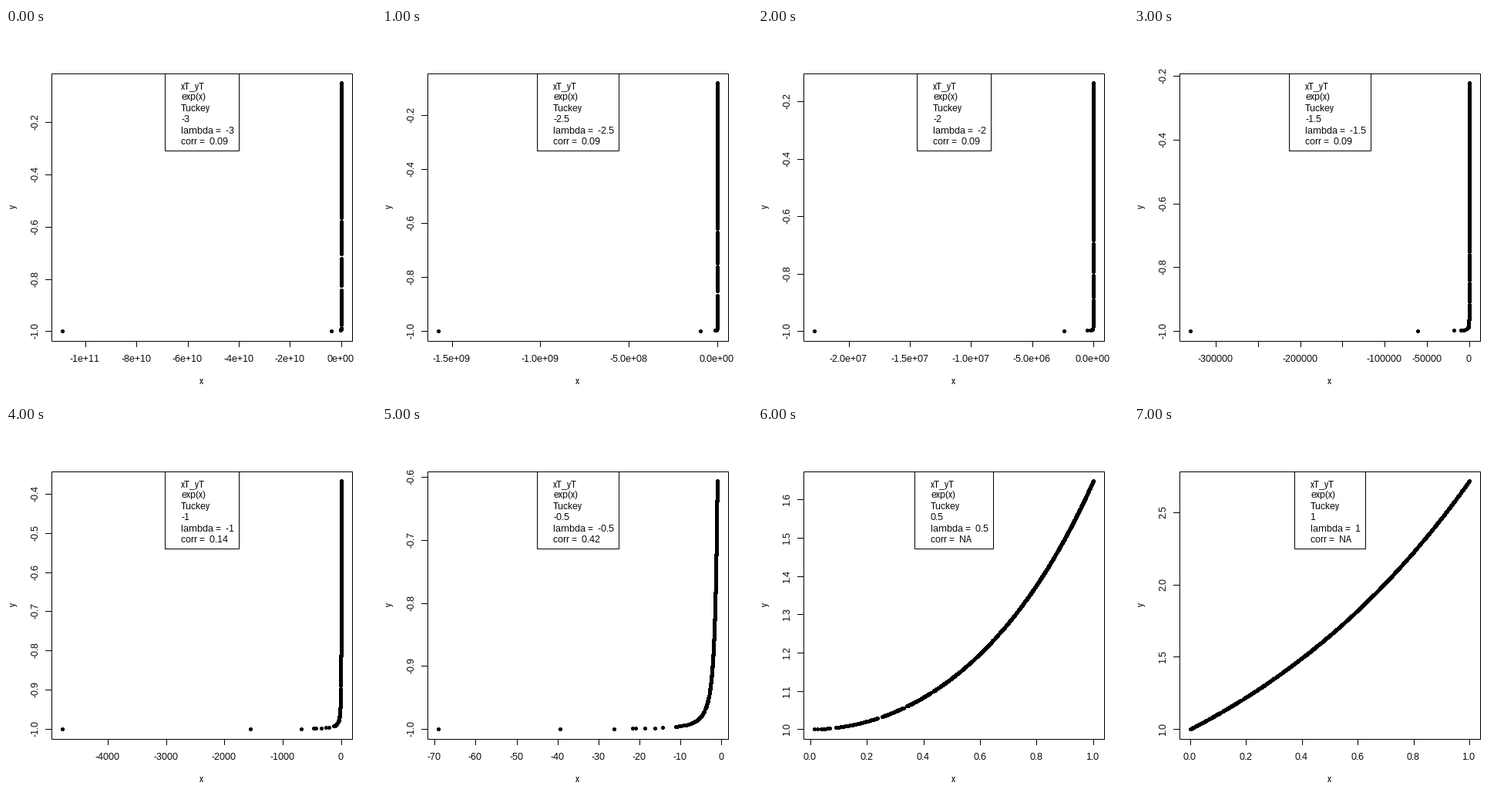
Write a matplotlib script that moves like this. It is 480 by 480 pixels and loops after 8 s.

```python
import math

import matplotlib.pyplot as plt
import numpy as np
from matplotlib.animation import FuncAnimation
from matplotlib.collections import PolyCollection
from matplotlib.patches import Rectangle

plt.rcParams["font.family"] = "Liberation Sans"
plt.rcParams["font.size"] = 9
plt.rcParams["text.hinting"] = "native"
plt.rcParams["text.hinting_factor"] = 1

SIZE = 480
PX = 0.75  # points per pixel at 96 dpi
LEFT, RIGHT, TOP, BOTTOM = 59.04, 449.76, 59.04, 406.56
MID_X, MID_Y = (LEFT + RIGHT) / 2, (TOP + BOTTOM) / 2
LINE = 14.4

# lambda, correlation, x tick step, x label format, y tick step
STEPS = [
    (-3, "0.09", 2e10, "%.0e", 0.2),
    (-2.5, "0.09", 5e8, "%.1e", 0.2),
    (-2, "0.09", 5e6, "%.1e", 0.2),
    (-1.5, "0.09", 5e4, "%.0f", 0.2),
    (-1, "0.14", 1000, "%.0f", 0.1),
    (-0.5, "0.42", 10, "%.0f", 0.1),
    (0.5, "NA", 0.2, "%.1f", 0.1),
    (1, "NA", 0.2, "%.1f", 0.5),
]

# Five pixel wide dot without its corner pixels
DOT = np.array([(-1, -2), (2, -2), (2, -1), (3, -1), (3, 2), (2, 2),
                (2, 3), (-1, 3), (-1, 2), (-2, 2), (-2, -1), (-1, -1)])


def make_sample():
    """Roughly uniform values on (0, 1), sparse near zero, with a few holes."""
    rng = np.random.default_rng(4)
    low = 1 / np.array([4777, 1550, 686, 471, 437, 345, 264, 206, 124, 117, 108, 96])
    n = 985
    rest = 0.0108 + 0.9887 * (np.arange(n) + rng.random(n)) / n
    edges = []
    for center, width in [(0.0605, 0.0071), (0.1125, 0.0085), (0.1866, 0.0086)]:
        rest = rest[abs(rest - center) > width / 2]
        edges += [center - width / 2, center + width / 2]
    return np.concatenate([low, rest, edges])


SAMPLE = make_sample()

fig = plt.figure(figsize=(5, 5), dpi=96, facecolor="white")
ax = fig.add_axes([0, 0, 1, 1])


def tukey(v, lam):
    return v**lam if lam > 0 else -(v**lam)


def line(x0, y0, x1, y1):
    # whole coordinates snap to the centre of their pixel
    ax.plot(np.floor([x0, x1]), np.floor([y0, y1]), color="black", lw=PX)


def frame_box(x0, y0, x1, y1):
    x0, y0, x1, y1 = np.floor([x0, y0, x1, y1])
    ax.add_patch(Rectangle((x0, y0), x1 - x0, y1 - y0, fc="white", ec="black",
                           lw=PX, joinstyle="miter"))


def dots(x, y):
    centers = np.floor(np.column_stack([x, y]))
    ax.add_collection(PolyCollection(centers[:, None] + DOT, facecolors="black",
                                     linewidths=0, zorder=3), autolim=False)


def label(x, y, text, ha="center", rotation=0):
    ax.text(x, y, text, ha=ha, va="baseline", rotation=rotation,
            rotation_mode="anchor")


def label_x(x, y, text):
    label(x - 1, y, text)


def label_y(x, y, text):
    label(x, y - 1, text, rotation=90)


def text_width(text):
    return sum({"-": 4, ".": 3}.get(c, 7) for c in text)


def scale(values, start, end):
    """Linear map with 4 % padding, and the padded data limits."""
    lo, hi = values.min(), values.max()
    pad = 0.04 * (hi - lo)
    lo, hi = lo - pad, hi + pad
    return lambda v: start + (v - lo) / (hi - lo) * (end - start), lo, hi


def ticks(lo, hi, step):
    return [k * step for k in range(math.ceil(lo / step), math.floor(hi / step) + 1)]


def draw_x_axis(to_x, values, fmt):
    free = -math.inf
    for v in values:
        x, text = to_x(v), fmt % v
        line(x, BOTTOM, x, BOTTOM + LINE / 2)
        half = text_width(text) / 2
        if x - half > free:
            label_x(x, 433, text)
            free = x + half + 10


def draw_y_axis(to_y, values):
    for v in values:
        y = to_y(v)
        line(LEFT - LINE / 2, y, LEFT, y)
        label_y(41, y, "%.1f" % v)


def draw_legend(lam, corr):
    name = "%g" % lam
    half = (85 + text_width(name)) / 2
    frame_box(MID_X - half, TOP, MID_X + half, TOP + 7 * LINE)
    rows = ["xT_yT", "exp(x)", "Tuckey", name, "lambda =  " + name, "corr =  " + corr]
    for i, row in enumerate(rows):
        label(math.floor(MID_X - half) + 21, round(79 + LINE * i), row, ha="left")


def draw(i):
    lam, corr, x_step, x_fmt, y_step = STEPS[i]
    ax.clear()
    ax.set(xlim=(0, SIZE), ylim=(SIZE, 0))
    ax.axis("off")

    x, y = tukey(SAMPLE, lam), tukey(np.exp(SAMPLE), lam)
    to_x, x_lo, x_hi = scale(x, LEFT, RIGHT)
    to_y, y_lo, y_hi = scale(y, BOTTOM, TOP)

    frame_box(LEFT, TOP, RIGHT, BOTTOM)
    draw_x_axis(to_x, ticks(x_lo, x_hi, x_step), x_fmt)
    draw_y_axis(to_y, ticks(y_lo, y_hi, y_step))
    label_x(MID_X, 462, "x")
    label_y(13, MID_Y, "y")
    dots(to_x(x), to_y(y))
    draw_legend(lam, corr)
    return []


anim = FuncAnimation(fig, draw, frames=len(STEPS), init_func=lambda: [],
                     interval=1000, repeat=True)
plt.show()
```
